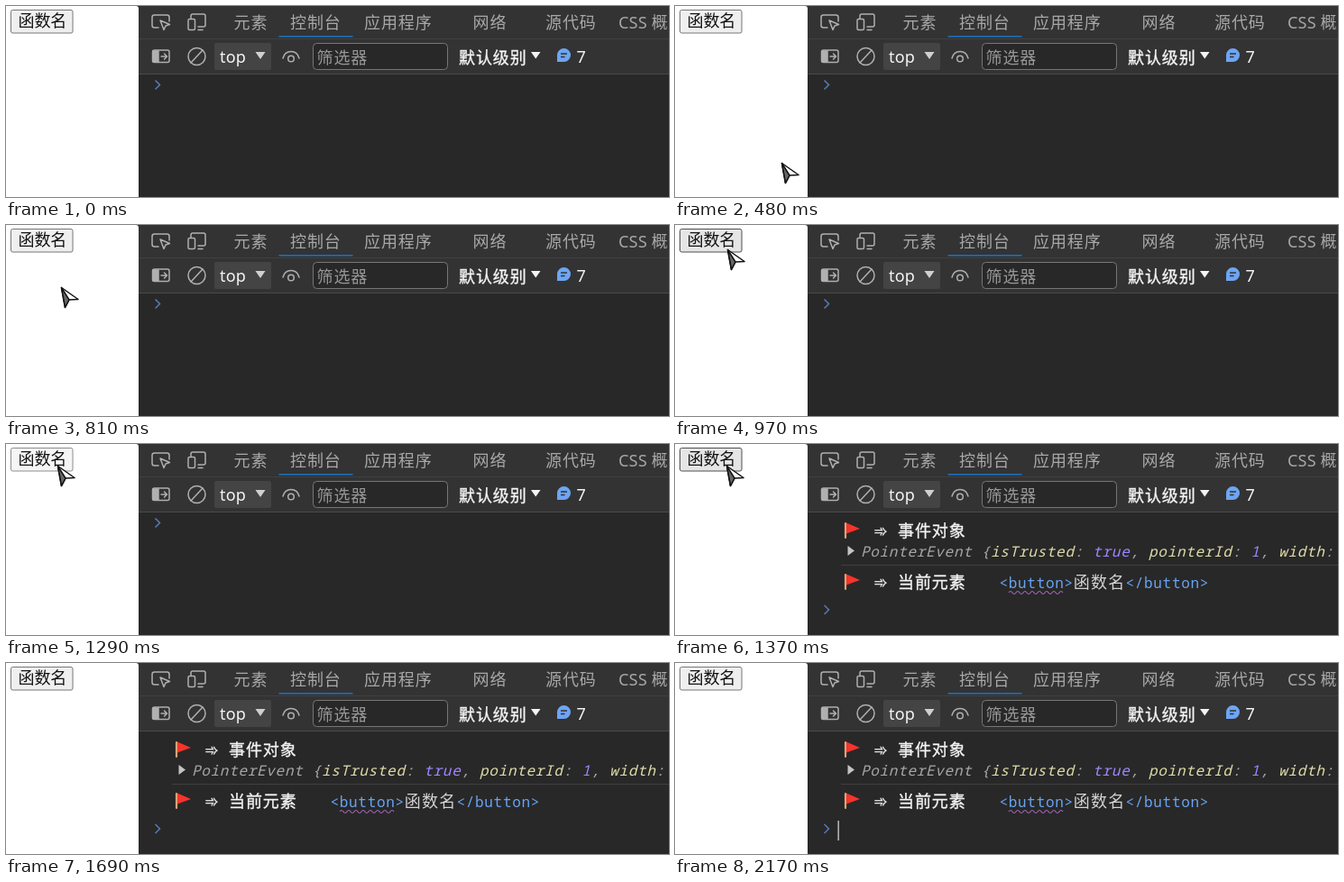
These frames come from a looping animation (735 by 212 pixels, 2.66 s). An HTML page:

```html
<!DOCTYPE html>
<html lang="zh">
<head>
<meta charset="utf-8">
<title>Console</title>
<style>
html, body { margin: 0; width: 100%; height: 100%; overflow: hidden; background: #282828; }
svg { display: block; width: 735px; height: 212px; }
text { font: 18px "Noto Sans", "Noto Sans CJK SC", sans-serif; letter-spacing: .9px; white-space: pre; }
.tab { fill: #a8a8a8; }
.latin { letter-spacing: .2px; }
.bright { fill: #f4f4f4; }
.strong { stroke: #f4f4f4; stroke-width: .35; }
.mono { font: 500 16px "Noto Sans Mono", "Noto Sans CJK SC", monospace; letter-spacing: .69px; fill: #a6a6a6; }
.italic { font-style: italic; }
.key { fill: #dedba8; }
.value { fill: #9f86ff; }
.markup { fill: #67a4f2; }
.cjk { font-size: 18px; font-weight: 400; letter-spacing: 1.2px; fill: #d4d4d4; }
.arrow { font: 18px "DejaVu Sans", sans-serif; letter-spacing: 0; }
.icon { fill: none; stroke: #b0b0b0; stroke-width: 1.5; stroke-linejoin: round; stroke-linecap: round; }
</style>
</head>
<body>
<svg viewBox="0 0 735 212">
  <defs>
    <g id="flag">
      <path d="M1 1V17" stroke="#d9a577" stroke-width="2.2" stroke-linecap="round"/>
      <path d="M2 .5L17 7L2 12.500Z" fill="#f5342d"/>
    </g>
  </defs>

  <!-- developer tools -->
  <rect x="145" width="590" height="212" fill="#282828"/>
  <rect x="145" width="590" height="76" fill="#333"/>
  <path d="M147 36.500H735" stroke="#404040"/>
  <path d="M147 75.500H735" stroke="#4a4a4a"/>
  <path d="M0 0H144Q147 0 147 3V212H0Z" fill="#fff"/>

  <g class="icon">
    <path d="M169 24H164.500Q162 24 162 21.500V12.500Q162 10 164.500 10H178.500Q181 10 181 12.500V17"/>
    <path d="M171 16L181.500 20.500L177 22L175 26.500Z"/>
    <path d="M205 14V11Q205 9 207 9H219Q221 9 221 11V21Q221 23 219 23H213M213 26.500H218"/>
    <rect x="202" y="14.500" width="7.500" height="12" rx="1.500"/>
    <rect x="162.500" y="49" width="18.500" height="13.500" rx="2"/>
    <path d="M163 50H169V62H163Z" fill="#b0b0b0"/>
    <path d="M172 56H178M175.500 53L178.500 56L175.500 59"/>
    <circle cx="211.500" cy="56" r="9.500"/>
    <path d="M205 63L218 49"/>
    <path d="M307 58Q309 50.500 316 50.500T325 58"/>
    <circle cx="316" cy="58.500" r="3.300"/>
  </g>

  <g class="tab">
    <text x="252.500" y="24.500">元素</text>
    <text x="315" y="24.500">控制台</text>
    <text x="397" y="24.500">应用程序</text>
    <text x="517.500" y="24.500">网络</text>
    <text x="598" y="24.500">源代码</text>
    <text class="latin" x="679" y="24.500">CSS 概</text>
  </g>
  <rect x="302.500" y="33" width="82" height="1.500" fill="#1a72c4"/>

  <rect x="231" y="41" width="63" height="30" rx="2" fill="#444"/>
  <text class="latin bright" x="237" y="63">top</text>
  <path d="M276.500 51H287.500L282 59Z" fill="#d0d0d0"/>
  <rect x="340.500" y="41.500" width="149" height="29" rx="4" fill="#282828" stroke="#767676"/>
  <text x="344.500" y="64" fill="#979797">筛选器</text>
  <text class="bright strong" x="502" y="63.500">默认级别</text>
  <path d="M582 51H592.500L587.250 58.500Z" fill="#f4f4f4"/>
  <path d="M611 62V54.500A7.500 7.500 0 1 1 618.500 62Z" fill="#6ea5f3"/>
  <path d="M615 53H622M615 56.500H619.500" stroke="#333" stroke-width="1.300"/>
  <text class="bright" x="632.500" y="63">7</text>

  <!-- console output -->
  <g id="log">
    <use href="#flag" x="188" y="87"/>
    <text class="arrow bright strong" x="220.500" y="103">➾</text>
    <text class="bright strong" x="247" y="103">事件对象</text>
    <path d="M191.500 113L199 118.500L191.500 124Z" fill="#c4c4c4"/>
    <text class="mono italic" x="206" y="125">PointerEvent {<tspan class="key">isTrusted</tspan>: <tspan class="value">true</tspan>, <tspan class="key">pointerId</tspan>: <tspan class="value">1</tspan>, <tspan class="key">width</tspan>:</text>
    <path d="M184 134.500H735" stroke="#404040"/>
    <use href="#flag" x="188" y="144"/>
    <text class="arrow bright strong" x="220.500" y="160">➾</text>
    <text class="bright strong" x="247" y="160">当前元素</text>
    <text class="mono markup" x="359.500" y="159.500">&lt;button&gt;<tspan class="cjk">函数名</tspan>&lt;/button&gt;</text>
    <path d="M370 165q2 -3 4 0t4 0t4 0t4 0t4 0t4 0t4 0t4 0t4 0t4 0t4 0t4 0t4 0t4 0t4 0" fill="none" stroke="#a366b8" stroke-width="1.200"/>
  </g>
  <path id="prompt" d="M165.500 82.500L170.500 87.500L165.500 92.500" fill="none" stroke="#567bb5" stroke-width="1.500"/>
  <rect id="caret" x="180.500" y="175" width="1.300" height="22" fill="#d0d0d0"/>

  <!-- page -->
  <rect id="button" x="5.500" y="4.500" width="68.500" height="25.500" rx="2"/>
  <text x="13.500" y="22.500" fill="#111" style="letter-spacing:-.1px">函数名</text>
  <g id="pointer" stroke="#111" stroke-width="1.500" stroke-linejoin="round">
    <path d="M.5 .5L19 13.500L9 14L4.500 22.500Z" fill="#fff"/>
    <path d="M.5 .5L9 14L4.500 22.500Z" fill="#666"/>
  </g>
</svg>
<script>
const LOOP = 2660, CLICK = 1370, CARET = 2170;
const el = id => document.getElementById(id);
const log = el('log'), prompt = el('prompt'), caret = el('caret');
const button = el('button'), pointer = el('pointer');

// [start, x, y]; no position means out of sight
const path = [
  [0], [480, 118, 174], [560, 101, 118], [640, 82, 73], [720, 68, 70], [810, 61, 69],
  [970, 58, 27], [1050, 58, 26], [1130, 57, 24], [1530, 68, 52], [1610, 98, 142], [1690]
];
// [start, fill, border]
const rest = ['#efefef', '#767676'], hover = ['#e5e5e5', '#4f4f4f'], active = ['#f5f5f5', '#8d8d8d'];
const looks = [[0, ...rest], [970, ...hover], [1290, ...active], [1370, ...hover], [1530, ...rest]];

const at = (steps, t) => steps.findLast(s => s[0] <= t);
const show = (node, on) => node.setAttribute('visibility', on ? 'visible' : 'hidden');

function draw(now) {
  const t = now % LOOP;
  const [, x, y] = at(path, t);
  const [, fill, border] = at(looks, t);
  const clicked = t >= CLICK;

  show(pointer, x !== undefined);
  if (x !== undefined) pointer.setAttribute('transform', `translate(${x} ${y})`);
  button.setAttribute('fill', fill);
  button.setAttribute('stroke', border);
  show(log, clicked);
  show(caret, t >= CARET);
  prompt.setAttribute('transform', `translate(0 ${clicked ? 96.5 : 0})`);
}

const start = performance.now();
function tick() {
  draw(performance.now() - start);
  requestAnimationFrame(tick);
}
tick();
</script>
</body>
</html>
```
